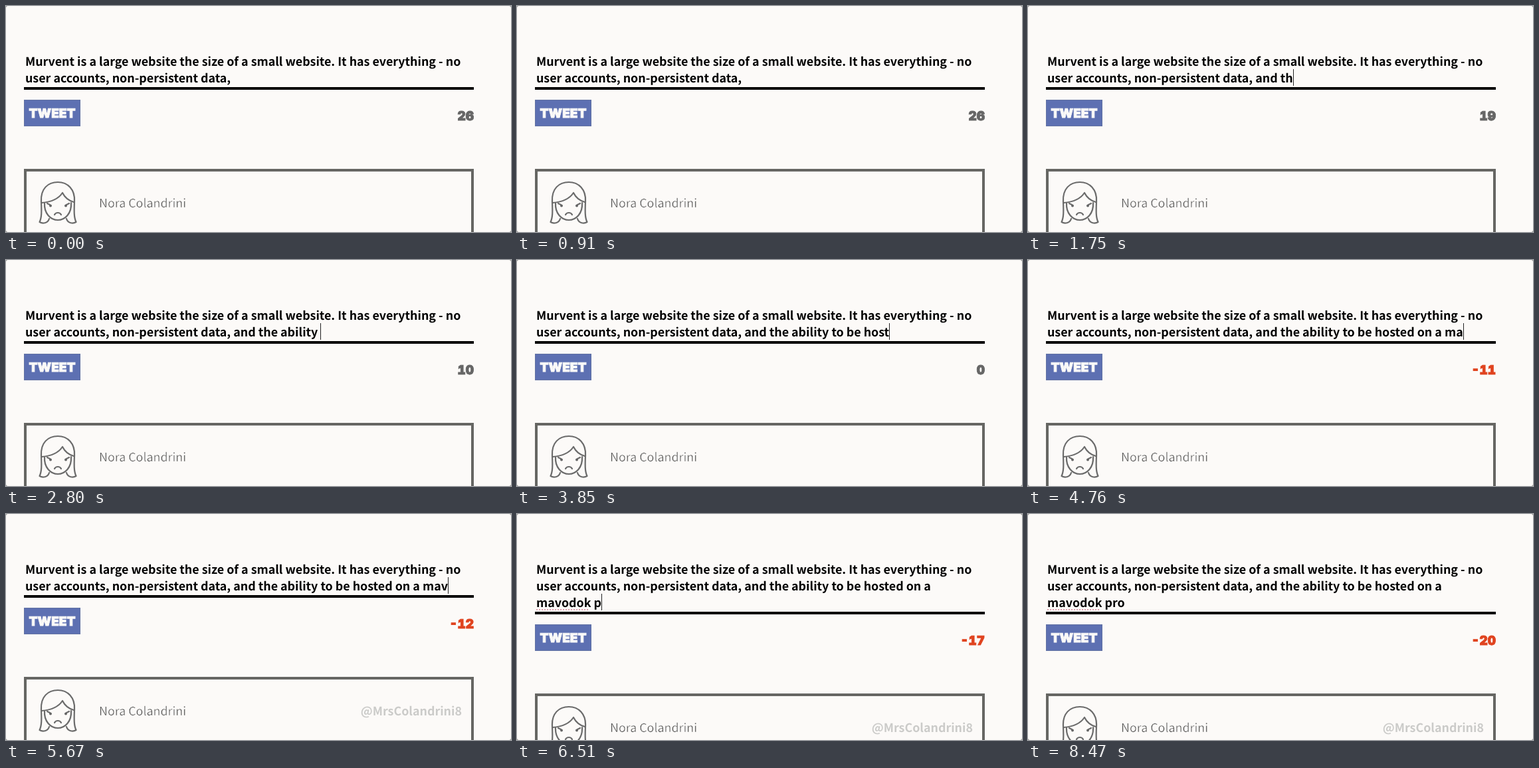
Recreate the animation shown at these times as an HTML page. Size 760 by 340 pixels, loop 8540 ms.

```html
<!DOCTYPE html>
<html lang="en">
<head>
<meta charset="utf-8">
<title>Message box</title>
<style>
  html, body { margin: 0; width: 100%; height: 100%; overflow: hidden; background: #8a8a88; }
  svg { display: block; width: 760px; height: 340px; }
  text { font-family: "Noto Sans CJK JP", "Noto Sans CJK SC", "Noto Sans", sans-serif; font-size: 17.85px; white-space: pre; text-rendering: geometricPrecision; }
  .typed, .handle { font-weight: 700; }
  .name { font-weight: 300; fill: #555; stroke: #fcfaf8; stroke-width: .4; }
  .handle { fill: #cbcbc9; text-anchor: end; }
  .block { font: 900 19px Inter, Roboto, sans-serif; stroke-width: .9; }
  .label { fill: #fcfaf8; stroke: #fcfaf8; text-anchor: middle; }
  .count { fill: #666; stroke: #666; text-anchor: end; font-variant-numeric: tabular-nums; }
  .count.over { fill: #e0431f; stroke: #e0431f; }
  .icon { fill: none; stroke: #6b6b6b; stroke-width: 2.2; stroke-linecap: round; stroke-linejoin: round; }
  .icon circle { fill: #666; stroke: none; }
</style>
</head>
<body>
<svg viewBox="0 0 760 340">
  <rect width="760" height="340" rx="3" fill="#fcfaf8"/>
  <text class="typed" x="29" y="90"></text>
  <text class="typed" x="29" y="115"></text>
  <text class="typed" x="29" y="140"></text>
  <line id="spell" x1="30" x2="110" y1="144" y2="144" stroke="#d9899b" stroke-width="2" stroke-linecap="round" stroke-dasharray="0.1 3.9"/>
  <rect id="caret" width="1" height="25" fill="#222"/>
  <g id="below">
    <rect x="27" y="122" width="677" height="4"/>
    <rect x="27.5" y="141.5" width="84" height="39" fill="#5d70b2" stroke="#6272a3"/>
    <text class="block label" x="69.5" y="167.5">TWEET</text>
    <text class="block count" id="count" x="704" y="172"></text>
    <rect x="29" y="247" width="673" height="200" fill="none" stroke="#666663" stroke-width="4"/>
    <g class="icon">
      <path d="M65 320C63 327 55 328 50.500 325C54 318 53.500 308 53 294C52 275 63 265 78 265S104 276 103 294C102.500 308 102 318 105.500 325C101 328 93 327 91 320"/>
      <path d="M58 296C57 312 67 322 78 322C89 322 99 312 98 296"/>
      <path d="M54 296C67 295 79 290 85 281C89 289 95 293 102 295"/>
      <path d="M62 297L66 299M95 297L91 299M73 314C75 310 81 310 83 314"/>
      <circle cx="67" cy="300.500" r="2"/>
      <circle cx="90" cy="300.500" r="2"/>
    </g>
    <text class="name" x="140" y="303">Nora Colandrini</text>
    <text class="handle" id="handle" x="686" y="303">@MrsColandrini8</text>
  </g>
</svg>
<script>
  const LOOP = 8540, LIMIT = 140, HANDLE_AT = 5040, LAG = 70;
  const message = "Murvent is a large website the size of a small website. It has everything - no " +
    "user accounts, non-persistent data, and the ability to be hosted on a mavodok pro";
  // [time in ms, characters typed]; key presses are evenly spaced in between
  const keys = [[-650, 114], [1000, 114], [1660, 121], [3840, 141], [4680, 151],
    [5320, 152], [5740, 152], [6500, 158], [6860, 160], [LOOP, 160]];
  const $ = id => document.getElementById(id);
  const lines = document.querySelectorAll(".typed");
  const caret = $("caret"), count = $("count");
  const show = (el, on) => el.setAttribute("visibility", on ? "visible" : "hidden");

  // Number of typed characters and the time of the latest key press
  function typing(t) {
    let i = keys.length - 2;
    while (i > 0 && keys[i][0] > t) i--;
    const [t0, n0] = keys[i], [t1, n1] = keys[i + 1];
    const step = n1 > n0 ? (t1 - t0) / (n1 - n0) : Infinity;
    const done = Math.floor((t - t0) / step);
    return { n: n0 + done, last: done ? t0 + done * step : t0 };
  }

  function draw(t) {
    const { n, last } = typing(t);
    const wrapped = n >= 156;
    const parts = [message.slice(0, 78), message.slice(79, wrapped ? 148 : n), wrapped ? message.slice(149, n) : ""];
    parts.forEach((s, i) => { if (lines[i].textContent !== s) lines[i].textContent = s; });

    const row = wrapped ? 2 : 1;
    caret.setAttribute("x", Math.round(29 + lines[row].getComputedTextLength()));
    caret.setAttribute("y", 70 + row * 25);
    show(caret, (t - last) % 1000 < 500);
    show($("spell"), n >= 157);

    const left = LIMIT - typing(t - LAG).n;
    count.textContent = left;
    count.classList.toggle("over", left < 0);
    show($("handle"), t >= HANDLE_AT);
    $("below").setAttribute("transform", `translate(0 ${wrapped ? 25 : 0})`);
  }

  const start = performance.now();
  function tick() {
    draw((performance.now() - start) % LOOP);
    requestAnimationFrame(tick);
  }
  draw(0);
  requestAnimationFrame(tick);
</script>
</body>
</html>
```
